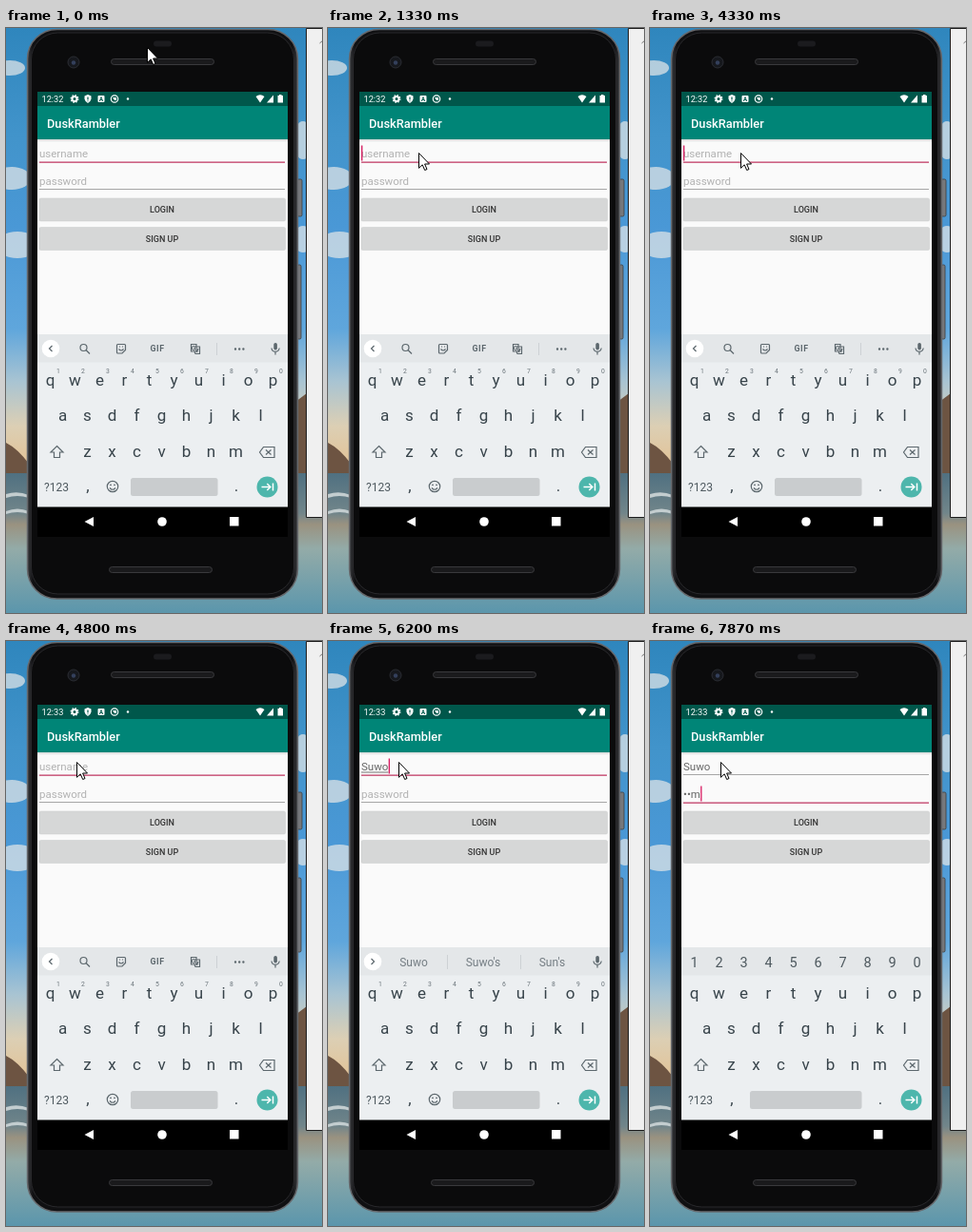
These frames come from a looping animation (332x615 px, 8 s). An HTML page:

```html
<!DOCTYPE html>
<html lang="en">
<head>
<meta charset="utf-8">
<title>Login screen</title>
<style>
html, body { margin: 0; width: 100%; height: 100%; overflow: hidden; background: #000; }
svg { display: block; width: 332px; height: 615px; font-family: Roboto, sans-serif; }
.mid { text-anchor: middle; }
.key { font-size: 17px; fill: #37434a; }
.hint { font-size: 11.5px; fill: #b2b2b2; }
.entry { font-size: 11.5px; fill: #666; }
.btn { font-size: 9px; font-weight: 500; fill: #333; }
.sug { font-size: 12px; fill: #747d83; }
.line { fill: none; stroke: #5c676d; stroke-width: 1.2; }
</style>
</head>
<body>
<svg viewBox="0 0 332 615">
  <defs>
    <linearGradient id="sky" x2="0" y2="1">
      <stop offset="0" stop-color="#2f86bd"/>
      <stop offset=".25" stop-color="#4294cb"/>
      <stop offset=".45" stop-color="#4a98d6"/>
      <stop offset=".68" stop-color="#5fa6dc"/>
      <stop offset=".8" stop-color="#a9c4d2"/>
      <stop offset=".9" stop-color="#dccfb4"/>
      <stop offset="1" stop-color="#e3c193"/>
    </linearGradient>
    <linearGradient id="sea" x2="0" y2="1">
      <stop offset="0" stop-color="#4d6f80"/>
      <stop offset=".3" stop-color="#71858a"/>
      <stop offset=".38" stop-color="#9a9280"/>
      <stop offset=".55" stop-color="#93aba8"/>
      <stop offset="1" stop-color="#5b96ac"/>
    </linearGradient>
    <linearGradient id="edge">
      <stop offset="0" stop-color="#3a3b3e"/>
      <stop offset=".02" stop-color="#101012"/>
      <stop offset=".98" stop-color="#101012"/>
      <stop offset="1" stop-color="#3a3b3e"/>
    </linearGradient>
    <linearGradient id="shade" x2="0" y2="1">
      <stop offset="0" stop-color="#d2d5d5"/>
      <stop offset="1" stop-color="#fafafa"/>
    </linearGradient>
  </defs>

  <!-- seaside wallpaper -->
  <rect width="332" height="465" fill="url(#sky)"/>
  <g fill="#dde3e6" opacity=".75">
    <ellipse cx="4" cy="42" rx="16" ry="8"/>
    <ellipse cx="6" cy="158" rx="20" ry="12"/>
    <ellipse cx="12" cy="228" rx="22" ry="14"/>
    <ellipse cx="312" cy="118" rx="10" ry="20"/>
    <ellipse cx="312" cy="222" rx="10" ry="14"/>
  </g>
  <rect y="465" width="332" height="150" fill="url(#sea)"/>
  <path d="M0 436Q12 442 24 458V468H0ZM300 396L316 384V468H300Z" fill="#6d5442"/>
  <path d="M0 490Q12 486 24 491V494Q12 490 0 494ZM0 508Q12 503 24 508V511Q12 507 0 511Z" fill="#c3cdcf"/>

  <!-- window behind the phone -->
  <path d="M315.5 .5H340V514.5H315.5Z" fill="#f0f0f0" stroke="#1c1c1c"/>
  <path d="M333 13L329.500 16" stroke="#777" fill="none"/>

  <!-- phone -->
  <g fill="#77797c" stroke="#3a3b3d" stroke-width=".8">
    <rect x="306" y="159" width="5" height="39" rx="1.500"/>
    <rect x="306" y="249" width="4" height="78" rx="1.500"/>
  </g>
  <rect x="22.500" y="1.500" width="284" height="598.500" rx="31" fill="url(#edge)" stroke="#66686c" stroke-width="1.500"/>
  <rect x="26.500" y="5" width="276" height="590" rx="28" fill="#0b0b0c" stroke="#29292c"/>
  <rect x="155" y="13.500" width="19" height="6" rx="3" fill="#1b1b1e"/>
  <circle cx="71" cy="36" r="6" fill="#16181d" stroke="#2b2d33"/>
  <circle cx="71" cy="36.500" r="2.200" fill="#34405c"/>
  <g fill="#1a1a1c" stroke="#39393c">
    <rect x="110.500" y="32.500" width="108" height="6" rx="3"/>
    <rect x="108.500" y="566.500" width="108" height="6" rx="3"/>
  </g>
  <rect x="33" y="67" width="263" height="468"/>

  <!-- app -->
  <rect x="33" y="117" width="263" height="206" fill="#fafafa"/>
  <rect x="33" y="117" width="263" height="3" fill="url(#shade)"/>
  <rect x="33" y="67" width="263" height="15" fill="#00574b"/>
  <rect x="33" y="82" width="263" height="35" fill="#008577"/>
  <g fill="#fff">
    <text id="clock" x="37.500" y="78" font-size="9.200"></text>
    <circle cx="72" cy="74.500" r="2.500" fill="none" stroke="#fff" stroke-width="2"/>
    <circle cx="72" cy="74.500" r="3.900" fill="none" stroke="#fff" stroke-width="1.200" stroke-dasharray="1.530"/>
    <path d="M86 70L89.500 71.500V74.500Q89 77.500 86 79Q83 77.500 82.500 74.500V71.500Z"/>
    <rect x="96.500" y="71" width="7" height="7" rx="1"/>
    <circle cx="114" cy="74.500" r="3.700" fill="none" stroke="#fff" stroke-width="1.200"/>
    <path d="M112 73H116V76H114Z"/>
    <circle cx="128" cy="74.500" r="1.200"/>
    <path d="M262.500 72Q267 68.500 271.500 72L267 78.500ZM274 78.500H281V70.500ZM285.500 71H287V70H289.500V71H291V78.500H285.500Z"/>
    <path d="M86 72.500V75.500M86 76.500V77.300" stroke="#00574b" stroke-width="1.200"/>
    <path d="M98.300 77L100 72.500L101.700 77M99 75.500H101" fill="none" stroke="#00574b" stroke-width=".9"/>
    <text x="43" y="105" font-size="12.800" font-weight="500">DuskRambler</text>
  </g>
  <rect id="line1" x="35" width="258" />
  <rect id="line2" x="35" width="258" />
  <text id="hint1" class="hint" x="35" y="136">username</text>
  <text id="hint2" class="hint" x="35" y="165">password</text>
  <text id="user" class="entry" x="35" y="136"></text>
  <text id="pass" class="entry" x="35" y="165"></text>
  <rect id="under" x="35" y="137.500" height="1" fill="#777"/>
  <rect id="caret" width="1.300" height="16" fill="#d81b60"/>
  <g fill="#d6d7d7" stroke="#c9caca" stroke-width=".5">
    <rect x="35" y="179" width="258.500" height="24" rx="1.500"/>
    <rect x="35" y="209.500" width="258.500" height="24" rx="1.500"/>
  </g>
  <text class="btn mid" x="164" y="194">LOGIN</text>
  <text class="btn mid" x="164" y="224.500">SIGN UP</text>

  <!-- keyboard -->
  <rect x="33" y="322" width="263" height="181.500" fill="#eceff1"/>
  <rect x="33" y="322" width="263" height="29.500" fill="#e4e7e9"/>
  <g id="strip">
    <circle cx="47" cy="337" r="9.300" fill="#fff"/>
    <path id="chevron" class="line" d="M1.500-3L-1.500 0L1.500 3"/>
    <rect x="281.300" y="331" width="3.600" height="7.500" rx="1.800" fill="#5c676d"/>
    <path class="line" d="M279 336.500Q279.500 340.300 283 340.300T287.200 336.500M283 340.500V343.500"/>
  </g>
  <g id="tools">
    <g class="line">
      <circle cx="81.500" cy="336" r="3.500"/>
      <path d="M84 338.500L88 342.500"/>
      <path d="M117.500 332.500H124.500Q125.500 332.500 125.500 333.500V338.500L122 342H117.500Q116.500 342 116.500 341V333.500Q116.500 332.500 117.500 332.500ZM118.500 337.500Q121 340.500 123.500 337.500M119 335H120M122 335H123"/>
      <path d="M194.500 332.500H200V340H194.500ZM198 335H203.500V342.500H199L198 340M200.500 341L202 337"/>
    </g>
    <text x="196.900" y="338.800" font-size="6.500" font-weight="700" class="mid" fill="#5c676d">G</text>
    <text x="159" y="340.300" font-size="8.800" font-weight="700" letter-spacing=".6" class="mid" fill="#5c676d">GIF</text>
    <path d="M221.500 331V344" stroke="#cdd1d4"/>
    <path d="M241 337.500H252" stroke="#5c676d" stroke-width="2.400" stroke-linecap="round" stroke-dasharray="0 4.200"/>
  </g>
  <g id="words">
    <path d="M125.500 330V345M202.500 330V345" stroke="#cdd1d4"/>
    <text class="sug mid" x="90" y="342"></text>
    <text class="sug mid" x="163" y="342"></text>
    <text class="sug mid" x="235.500" y="342"></text>
  </g>
  <g id="digits"></g>
  <g id="tips"></g>
  <g id="keys"></g>
  <path class="line" d="M53.500 439.500L60 446H56.500V451.500H50.500V446H47Z"/>
  <path class="line" d="M270.500 440.500H282V451.500H270.500L266.500 446ZM273 443.500L278.500 448.500M278.500 443.500L273 448.500"/>
  <text class="mid" x="53" y="486.500" font-size="12" fill="#4d585e">?123</text>
  <text class="key mid" x="86" y="487">,</text>
  <text class="key mid" x="242" y="487">.</text>
  <g id="smile">
    <circle class="line" cx="112" cy="482" r="5.700"/>
    <path class="line" d="M109 483.500Q112 487 115 483.500"/>
    <path d="M110 480.300H110.010M114 480.300H114.010" stroke="#5c676d" stroke-width="1.800" stroke-linecap="round"/>
  </g>
  <rect id="space" y="473" height="19" rx="2.500" fill="#c9ccce"/>
  <circle cx="274.500" cy="482.500" r="11" fill="#4db6ac"/>
  <path d="M268.500 482.500H277.500M274.300 479L277.800 482.500L274.300 486M280.500 478.500V486.500" fill="none" stroke="#fff" stroke-width="1.500"/>

  <!-- navigation -->
  <path d="M92 514V524L82.500 519ZM235 514H244.500V523.500H235Z" fill="#fff"/>
  <circle cx="164" cy="519" r="4.800" fill="#fff"/>

  <path id="mouse" d="M.5 .5V16.300L4.200 12.800L6.700 18.500L9 17.500L6.600 12H11.500Z" fill="#fff" stroke="#000" stroke-width="1"/>
</svg>
<script>
const $ = id => document.getElementById(id);
const show = (id, on) => $(id).setAttribute('visibility', on ? 'visible' : 'hidden');
const set = (id, attrs) => { for (const k in attrs) $(id).setAttribute(k, attrs[k]); };

function row(id, chars, x, y, css = '') {
  $(id).innerHTML += [...chars].map((c, i) =>
    `<text class="key mid" style="${css}" x="${x + i * 26}" y="${y}">${c}</text>`).join('');
}
row('keys', 'qwertyuiop', 46.5, 375.5);
row('keys', 'asdfghjkl', 59.5, 413);
row('keys', 'zxcvbnm', 85.5, 451);
row('tips', '1234567890', 55, 363, 'font-size:6.8px;fill:#6b757b');
row('digits', '1234567890', 46.5, 343, 'font-size:14.5px;fill:#4d585e');

// latest entry whose time has come
const at = (list, t) => list.filter(e => e[0] <= t).pop();

const typed = [[0, ''], [5400, 'S'], [5930, 'Su'], [6070, 'Suw'], [6200, 'Suwo']];
const secret = [[0, ''], [7530, 's'], [7670, '•a'], [7870, '••m']];
const guesses = [[0, '', '', ''], [5470, 'S', 'A', 'So'], [5930, 'Su', 'Sun', 'Sur'],
  [6070, 'Suw', 'Sun', 'Such'], [6200, 'Suwo', "Suwo's", "Sun's"]];
const path = [[0, 148, 20], [467, 148, 20], [600, 137, 50], [800, 114, 112], [1000, 100, 137],
  [1333, 95, 131], [4467, 95, 131], [4733, 74, 127], [8000, 74, 127]];

function pointer(t) {
  const step = 200 / 3, q = Math.floor((t + 4) / step) * step;
  const i = Math.max(1, path.findIndex(p => p[0] > q));
  const [t0, x0, y0] = path[i - 1], [t1, x1, y1] = path[i];
  const k = (q - t0) / (t1 - t0);
  return [Math.round(x0 + (x1 - x0) * k), Math.round(y0 + (y1 - y0) * k)];
}

function caretOn(t) {
  if (t < 4800) return t % 1000 >= 330 && t % 1000 < 870;
  return t >= 5400 && t < 6730 || t >= 7000;
}

// input underline: thin grey, or thicker and pink when focused
function underline(id, y, focused) {
  set(id, focused ? { y: y + .5, height: 1.3, fill: '#c23f68' } : { y, height: 1, fill: '#a6a6a6' });
}

function draw(t) {
  const user = at(typed, t)[1], pass = at(secret, t)[1];
  const second = t >= 7000, numbers = t >= 7070, suggest = t >= 5470 && !numbers;
  $('clock').textContent = t < 4800 ? '12:32' : '12:33';
  $('user').textContent = user;
  $('pass').textContent = pass;
  show('hint1', !user);
  show('hint2', !pass);

  const width = $('user').getComputedTextLength();
  set('under', { width });
  show('under', user && !second);
  const end = second ? $('pass').getComputedTextLength() : width;
  set('caret', { x: 35 + end + (end ? .3 : 0), y: second ? 152.5 : 123.5 });
  show('caret', caretOn(t));
  underline('line1', 140, !second);
  underline('line2', 169, second);

  show('strip', !numbers);
  show('tools', t < 5470);
  show('words', suggest);
  show('digits', numbers);
  show('tips', !numbers);
  show('smile', !numbers);
  set('space', numbers ? { x: 105, width: 117.5 } : { x: 131, width: 91.5 });
  set('chevron', { transform: `translate(47 337) scale(${suggest ? -1 : 1} 1)` });
  const words = at(guesses, t);
  document.querySelectorAll('.sug').forEach((el, i) => el.textContent = words[i + 1]);
  set('mouse', { transform: `translate(${pointer(t)})` });
}

function loop() {
  draw(performance.now() % 8000);
  requestAnimationFrame(loop);
}
loop();
</script>
</body>
</html>
```
